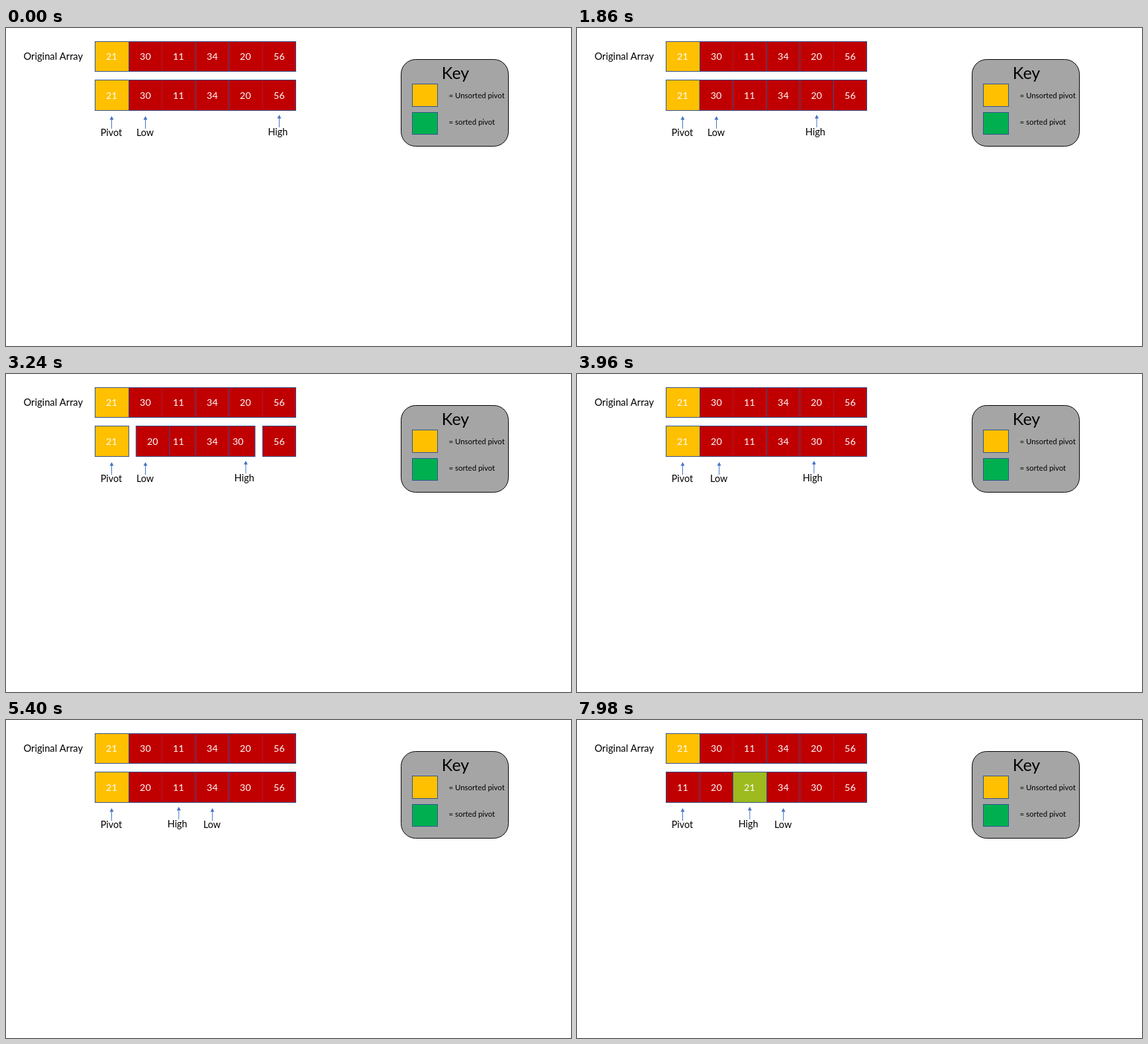
These frames come from a looping animation (853x480 px, 8 s). An HTML page with a canvas:

```html
<!DOCTYPE html>
<html lang="en">
<head>
<meta charset="utf-8">
<title>Quick sort partition</title>
<style>
html, body { margin: 0; width: 100%; height: 100%; overflow: hidden; background: #fff; }
canvas { display: block; }
</style>
</head>
<body>
<canvas id="stage" width="853" height="480"></canvas>
<script>
const ctx = document.getElementById('stage').getContext('2d');
const LOOP = 8000, TICK = 60, PHASE = 1820;
const RED = '#c00000', GOLD = '#ffc000', GREEN = '#00b050';
const BORDER = '#2f528f', ARROW = '#4472c4', SEAM = '#a81a2c';
const CELL = 50.55, LEFT = 134;
const values = [21, 30, 11, 34, 20, 56];

const clamp = u => Math.min(1, Math.max(0, u));
const smooth = u => u * u * u * (u * (6 * u - 15) + 10);
const progress = (t, phase) => clamp((t - phase * PHASE) / PHASE);
const slotX = slot => {
  const x = LEFT + slot * CELL;
  return Number.isInteger(slot) ? Math.round(x) : x;
};

function text(str, x, baseline, size, color = '#000', align = 'center') {
  ctx.font = `${size}px Lato, Carlito, sans-serif`;
  ctx.textAlign = align;
  ctx.fillStyle = color;
  ctx.fillText(str, x, baseline);
}

function box(x, y, w, h, fill) {
  ctx.fillStyle = fill;
  ctx.fillRect(x + 0.5, y + 0.5, w, h);
  ctx.strokeStyle = BORDER;
  ctx.lineWidth = 1;
  ctx.strokeRect(x + 0.5, y + 0.5, w, h);
}

function row(slots, y, h, baseline, pivotColor) {
  values.forEach((value, i) => {
    const x = slotX(slots[i]);
    const w = Number.isInteger(slots[i]) ? slotX(slots[i] + 1) - x : CELL;
    box(x, y, w, h, i === 0 ? pivotColor : RED);
    text(value, x + 25.4, baseline, 14.3, '#fff');
  });
  // Fainter seams between neighbouring red cells at rest
  if (!slots.every(Number.isInteger)) return;
  for (const seam of [2, 5]) {
    if (slots[0] === seam || slots[0] === seam - 1) continue;
    ctx.fillStyle = SEAM;
    ctx.fillRect(slotX(seam), y + 1, 1, h - 1);
  }
}

function pointer(label, x, top, labelX, baseline) {
  ctx.strokeStyle = ctx.fillStyle = ARROW;
  ctx.lineWidth = 1;
  ctx.beginPath();
  ctx.moveTo(x, top + 4);
  ctx.lineTo(x, top + 19);
  ctx.stroke();
  ctx.beginPath();
  ctx.moveTo(x, top);
  ctx.lineTo(x + 3, top + 5.5);
  ctx.lineTo(x - 3, top + 5.5);
  ctx.fill();
  text(label, labelX, baseline, 14.4);
}

function legend() {
  ctx.beginPath();
  ctx.roundRect(596.5, 47.5, 162, 131, 22);
  ctx.fillStyle = '#a5a5a5';
  ctx.fill();
  ctx.strokeStyle = '#000';
  ctx.lineWidth = 1;
  ctx.stroke();
  text('Key', 678.5, 77, 25);
  box(613, 84, 38, 34, GOLD);
  box(613, 127, 38, 33, GREEN);
  text('= Unsorted pivot', 668.5, 106, 11.4, '#000', 'left');
  text('= sorted pivot', 668.5, 146, 11.4, '#000', 'left');
}

function pivotColor(u) {
  const mix = (a, b) => Math.round(a + (b - a) * u);
  return `rgb(${mix(255, 0)}, ${mix(192, 176)}, ${mix(0, 80)})`;
}

function draw(t) {
  const [step, swapA, cross, swapB] = [0, 1, 2, 3].map(i => smooth(progress(t, i)));
  const slots = [2 * swapB, 1 + 3 * swapA, 2 - 2 * swapB, 3, 4 - 3 * swapA, 5];
  const low = 2 * CELL * cross;
  const high = -CELL * (step + 2 * cross);

  ctx.fillStyle = '#fff';
  ctx.fillRect(0, 0, 853, 480);
  text('Original Array', 26.5, 48, 14.7, '#000', 'left');
  row([0, 1, 2, 3, 4, 5], 20, 45, 48, GOLD);
  row(slots, 78, 46, 107, pivotColor(progress(t, 4)));
  pointer('Pivot', 159.5, 133, 159, 163);
  pointer('Low', 210.5 + low, 133, 210 + low, 163);
  pointer('High', 412.5 + high, 131, 410.3 + high, 162);
  legend();
}

const start = performance.now();
function frame() {
  const t = (performance.now() - start) % LOOP;
  draw(Math.floor(t / TICK) * TICK);
  requestAnimationFrame(frame);
}
frame();
</script>
</body>
</html>
```
